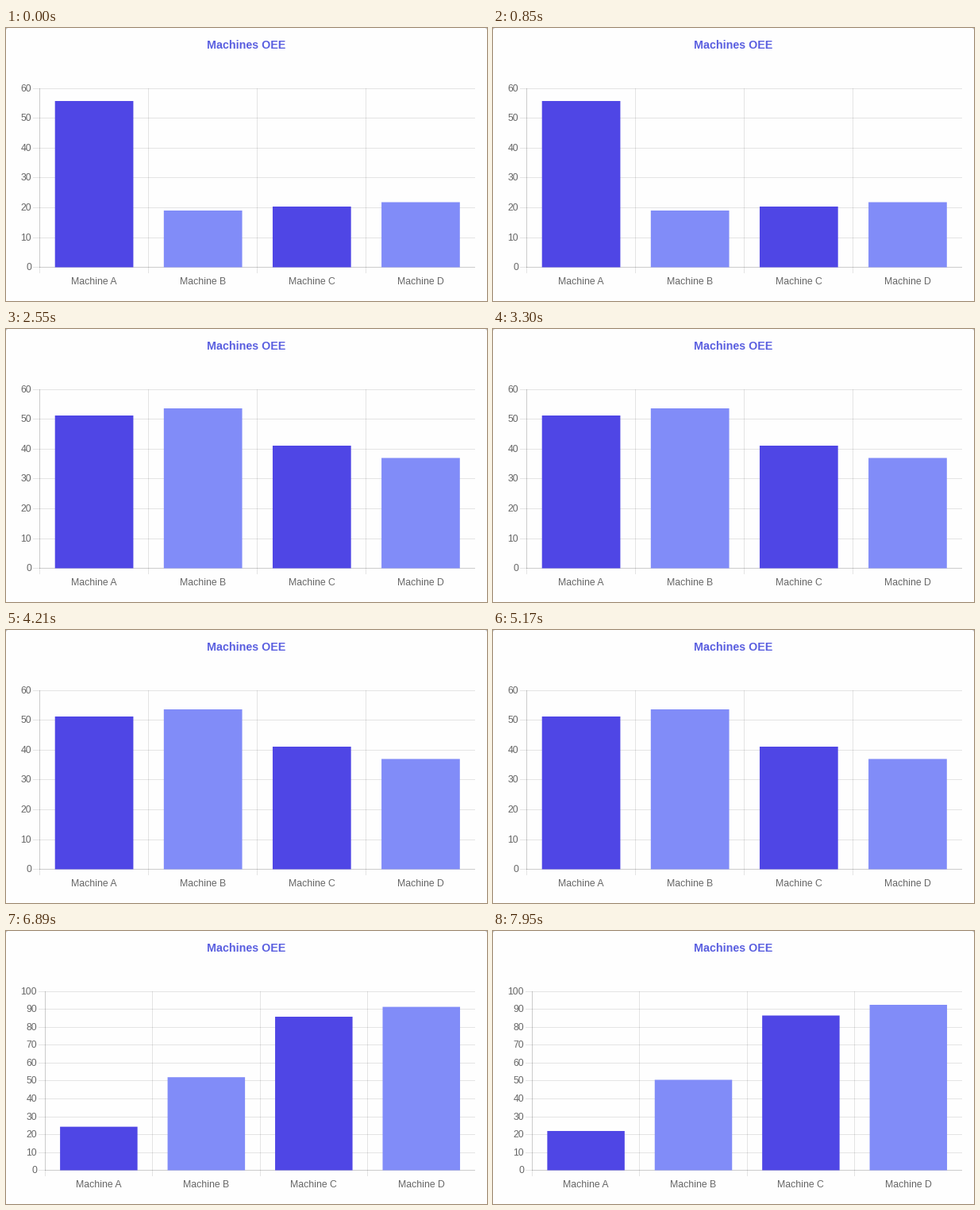
These frames come from a looping animation (606 px wide and 344 px high, 8 s). A matplotlib script:

```python
import matplotlib.pyplot as plt
from matplotlib.animation import FuncAnimation
from matplotlib.patches import Polygon, Rectangle

W, H, DPI = 606, 344, 100
STEP, FRAMES = 50, 160
RIGHT, TOP, BASE = 591, 76, 301
PT = 72 / DPI
DARK, LIGHT = "#4f46e5", "#818cf8"
NAMES = ["Machine A", "Machine B", "Machine C", "Machine D"]

# Bar tops in pixels for each data set, and when each refresh begins
TOPS = [(92, 230, 225, 219.5), (109, 100, 147, 162.5), (252, 187.5, 106.5, 93)]
LEFTS = [42.5, 42.5, 49.4]
STARTS = [900, 6300]
DURATION = 1000

plt.rcParams["font.family"] = "Liberation Sans"
fig = plt.figure(figsize=(W / DPI, H / DPI), dpi=DPI, facecolor="#fefefe")
ax = fig.add_axes([0, 0, 1, 1])
ax.set_xlim(0, W)
ax.set_ylim(H, 0)
ax.axis("off")


def label(x, y, text, ha="center", size=12.25, color="#666666", weight="normal"):
    return ax.text(x, y, text, ha=ha, va="baseline", fontsize=size * PT,
                   color=color, weight=weight)


def rule(x, y, w, h):
    return ax.add_patch(Rectangle((x, y), w, h, fc="black", alpha=0.1, lw=0,
                                  antialiased=False, zorder=1))


def scale(left, top_value):
    """Grid lines, axis borders and tick labels of one axis layout."""
    parts = []
    x0 = int(left)
    count = top_value // 10
    for k in range(count + 1):
        y = round(BASE + 0.1 - k * 225.3 / count)
        parts.append(rule(x0 - 8, y, RIGHT - x0 + 8, 1))
        parts.append(label(x0 - 10, y + 4, str(10 * k), ha="right"))
    slot = (RIGHT - left) / 4
    for k, name in enumerate(NAMES):
        x = int(left + k * slot)
        parts.append(rule(x, TOP, 1, BASE - TOP + 8))
        parts.append(label(left + (k + 0.5) * slot, 323, name))
    parts.append(rule(x0, TOP, 1, BASE - TOP + 1))
    parts.append(rule(x0, BASE, RIGHT - x0, 1))
    return parts


def bar_boxes(state):
    left = LEFTS[state]
    slot = (RIGHT - left) / 4
    return [(left + (k + 0.14) * slot, top, 0.72 * slot)
            for k, top in enumerate(TOPS[state])]


def ease_out_quart(p):
    return 1 - (1 - p) ** 4


scales = [scale(42.5, 60), scale(49.4, 100)]
boxes = [bar_boxes(s) for s in range(3)]
bars = [ax.add_patch(Rectangle((0, 0), 1, 1, fc=LIGHT if k % 2 else DARK, lw=0,
                               snap=False, zorder=2)) for k in range(4)]
label(303, 26, "Machines OEE", size=14.2, color="#5a5fe0", weight="bold")
for x, d in ((0, 2), (W, -2)):
    ax.add_patch(Polygon([(x, 0), (x + d, 0), (x, 2)], fc="#c4c4c8", lw=0))


def update(i):
    t = i * STEP
    state = sum(t >= s for s in STARTS)
    p = 1
    if state:
        p = min(1, (t - STARTS[state - 1] + 10) / DURATION)
    e = ease_out_quart(p)
    for bar, old, new in zip(bars, boxes[max(state - 1, 0)], boxes[state]):
        x, y, w = (a + (b - a) * e for a, b in zip(old, new))
        bar.set_bounds(x, y, w, BASE + 0.5 - y)
    for n, parts in enumerate(scales):
        for part in parts:
            part.set_visible((state == 2) == (n == 1))
    return bars


anim = FuncAnimation(fig, update, frames=FRAMES, interval=STEP, repeat=True,
                     repeat_delay=0, blit=False)
plt.show()
```
